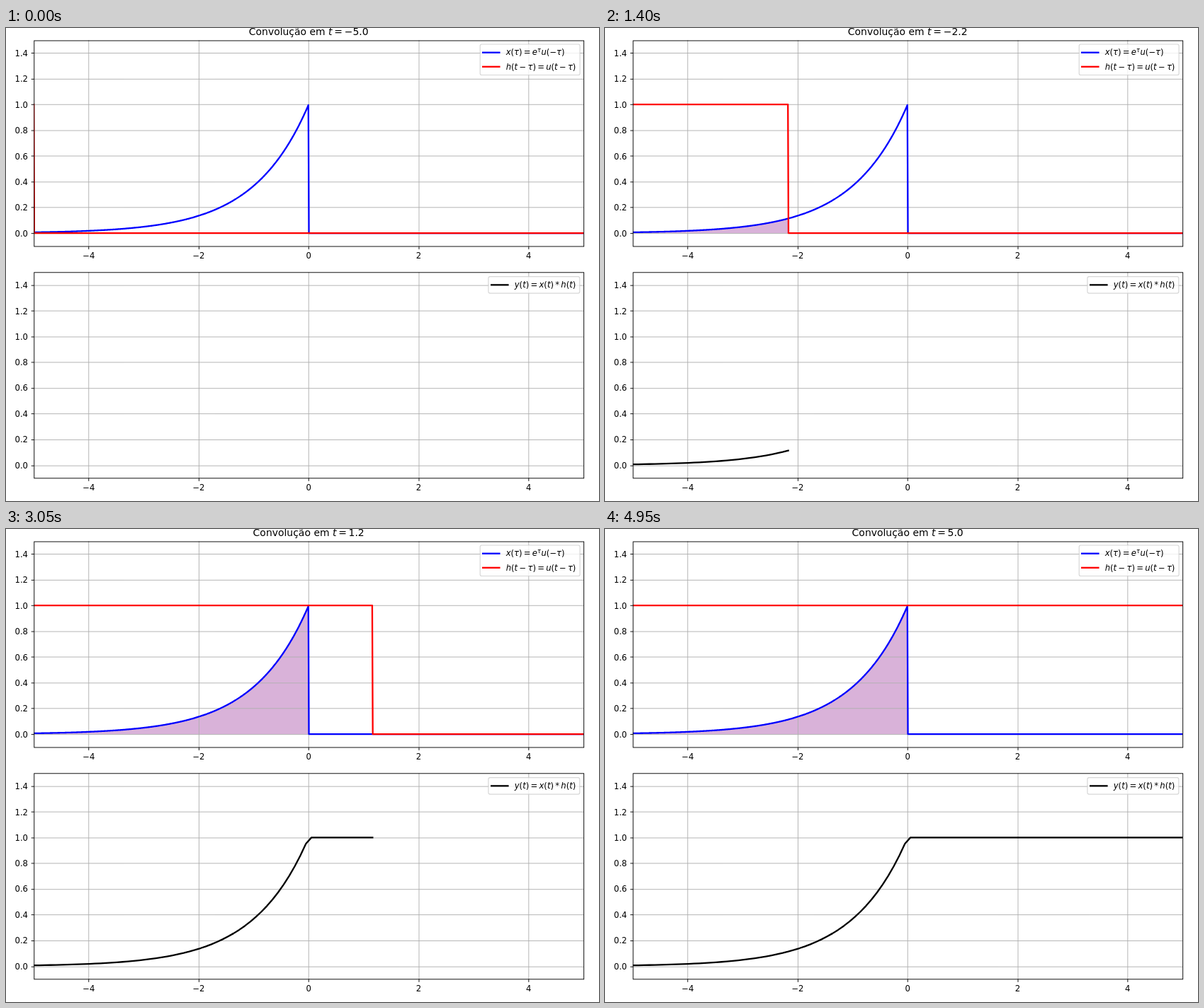
Animation of 837x669 px, one loop 5000 ms. Source, as an HTML page with a canvas:

```html
<!DOCTYPE html>
<html lang="pt">
<head>
<meta charset="utf-8">
<title>Convolução</title>
<style>
html, body { margin: 0; width: 100%; height: 100%; overflow: hidden; background: #fff; }
canvas { display: block; }
</style>
</head>
<body>
<canvas id="stage" width="837" height="669"></canvas>
<script>
// The figure is laid out on 1000 x 800 units at 100 dpi and scaled to the stage.
const W = 1000, H = 800, PT = 100 / 72;
const STEPS = 100, STEP_MS = 50, SAMPLES = 1000;
const FONT = '"DejaVu Sans", sans-serif';
const SMALL = 10 * PT, LARGE = 12 * PT, HAIR = 0.8 * PT, LINE = 2 * PT;
const TICK = 3.5 * PT, PAD = 0.4 * SMALL;
const LEFT = 46.72, RIGHT = 974, HEIGHT = 348.28;
const TOP = 20.5, BOTTOM = 413;

const stage = document.getElementById('stage');
const c = stage.getContext('2d');
c.scale(stage.width / W, stage.height / H);

const px = x => LEFT + (x + 5) / 10 * (RIGHT - LEFT);
const py = (top, y) => top + (1.5 - y) / 1.6 * HEIGHT;
const snap = v => Math.floor(v + 0.5) + 0.5;
const sample = k => -5 + 10 * k / (SAMPLES - 1);
const signal = tau => tau < 0 ? Math.exp(tau) : 0;
const timeAt = i => -5 + 10 * i / (STEPS - 1);
const minus = str => String(str).replace('-', '−');

function segment(x1, y1, x2, y2, color, width = HAIR) {
  c.strokeStyle = color;
  c.lineWidth = width;
  c.beginPath();
  c.moveTo(x1, y1);
  c.lineTo(x2, y2);
  c.stroke();
}

function text(str, x, y, size, align = 'left', style = '') {
  c.font = `${style} ${size}px ${FONT}`;
  c.textAlign = align;
  c.fillStyle = '#000';
  c.fillText(str, x, y);
}

// Math run: letters are italic, a blank is operator space, ^ raises the next sign.
function math(str, x, y, size, draw = true) {
  let raised = false;
  for (const ch of str) {
    if (ch === ' ') { x += 0.195 * size; continue; }
    if (ch === '^') { raised = true; continue; }
    const style = /[a-zτ]/.test(ch) ? 'italic' : '';
    const s = raised ? size * 0.7 : size;
    c.font = `${style} ${s}px ${FONT}`;
    const advance = c.measureText(ch).width;
    if (draw) text(ch, x, raised ? y - size * 0.38 : y, s, 'left', style);
    x += advance + (raised ? size * 0.05 : 0);
    raised = false;
  }
  return x;
}

function eachTick(top, onX, onY) {
  for (let x = -4; x <= 4; x += 2) onX(x, px(x));
  for (let k = 0; k < 8; k++) onY(k / 5, py(top, k / 5));
}

function drawGrid(top) {
  eachTick(top,
    (_, x) => segment(snap(x), top, snap(x), top + HEIGHT, '#b0b0b0'),
    (_, y) => segment(LEFT, snap(y), RIGHT, snap(y), '#b0b0b0'));
}

function drawFrame(top) {
  const x0 = snap(LEFT), y0 = snap(top), y1 = snap(top + HEIGHT);
  c.strokeStyle = '#000';
  c.lineWidth = HAIR;
  c.strokeRect(x0, y0, snap(RIGHT) - x0, y1 - y0);
  eachTick(top, (value, x) => {
    segment(snap(x), y1, snap(x), y1 + TICK, '#000');
    text(minus(value), x, Math.round(top + HEIGHT + 2 * TICK + 11), SMALL, 'center');
  }, (value, y) => {
    segment(x0 - TICK, snap(y), x0, snap(y), '#000');
    text(value.toFixed(1), LEFT - 2 * TICK, Math.round(y + 5.5), SMALL, 'right');
  });
}

function drawLegend(top, width, rows) {
  const rowHeight = 17, gap = 0.5 * SMALL;
  const x = RIGHT - gap - width, y = top + gap;
  const height = 2 * PAD + rows.length * (rowHeight + gap) - gap;
  c.beginPath();
  c.roundRect(snap(x), snap(y), width, height, 0.2 * SMALL);
  c.fillStyle = 'rgba(255,255,255,0.8)';
  c.fill();
  c.strokeStyle = 'rgba(204,204,204,0.8)';
  c.lineWidth = PT;
  c.stroke();
  rows.forEach(([label, color], i) => {
    const base = y + PAD + 13 + i * (rowHeight + gap);
    const lineY = snap(base - 0.35 * SMALL), lineX = x + PAD;
    segment(lineX - LINE / 2, lineY, lineX + 2 * SMALL + LINE / 2, lineY, color, LINE);
    math(label, lineX + 2.8 * SMALL, Math.round(base), SMALL);
  });
}

function curve(top, points, color) {
  c.save();
  c.beginPath();
  c.rect(LEFT, top, RIGHT - LEFT, HEIGHT);
  c.clip();
  c.strokeStyle = color;
  c.lineWidth = LINE;
  c.lineJoin = 'round';
  c.lineCap = 'square';
  c.beginPath();
  points.forEach(([x, y], i) => c[i ? 'lineTo' : 'moveTo'](px(x), py(top, y)));
  c.stroke();
  c.restore();
}

const input = Array.from({ length: SAMPLES }, (_, k) => [sample(k), signal(sample(k))]);
const output = Array.from({ length: STEPS }, (_, i) => [timeAt(i), Math.min(1, Math.exp(timeAt(i)))]);

function stepPoints(last) {
  const points = [[-5, 1], [sample(last), 1]];
  if (last < SAMPLES - 1) points.push([sample(last + 1), 0], [5, 0]);
  return points;
}

function fillOverlap(last) {
  const end = Math.min(last, SAMPLES / 2 - 1);
  if (end < 1) return;
  const zero = py(TOP, 0);
  c.fillStyle = 'rgba(128,0,128,0.3)';
  c.beginPath();
  c.moveTo(px(-5), zero);
  for (const [x, y] of input.slice(0, end + 1)) c.lineTo(px(x), py(TOP, y));
  c.lineTo(px(sample(end + 1)), zero);
  c.fill();
}

function drawTitle(t) {
  const lead = 'Convolução em ';
  const formula = 't = ' + minus(t.toFixed(1));
  const base = Math.round(TOP - 6 * PT);
  c.font = `${LARGE}px ${FONT}`;
  const leadWidth = c.measureText(lead).width;
  const x = px(0) - (leadWidth + math(formula, 0, 0, LARGE, false)) / 2;
  text(lead, x, base, LARGE);
  math(formula, x + leadWidth, base, LARGE);
}

function draw(i) {
  const t = timeAt(i);
  const last = Math.min(SAMPLES - 1, Math.floor((t + 5) * (SAMPLES - 1) / 10 + 1e-6));
  c.fillStyle = '#fff';
  c.fillRect(0, 0, W, H);
  fillOverlap(last);
  drawGrid(TOP);
  drawGrid(BOTTOM);
  curve(TOP, input, '#00f');
  curve(TOP, stepPoints(last), '#f00');
  if (i > 0) curve(BOTTOM, output.slice(0, i + 1), '#000');
  drawFrame(TOP);
  drawFrame(BOTTOM);
  drawLegend(TOP, 168.4, [['x(τ) = e^τu(−τ)', '#00f'], ['h(t − τ) = u(t − τ)', '#f00']]);
  drawLegend(BOTTOM, 154, [['y(t) = x(t) * h(t)', '#000']]);
  drawTitle(t);
}

const start = performance.now();
let shown = -1;
function tick() {
  const i = Math.floor((performance.now() - start) / STEP_MS) % STEPS;
  if (i !== shown) draw(shown = i);
  requestAnimationFrame(tick);
}
tick();
</script>
</body>
</html>
```
